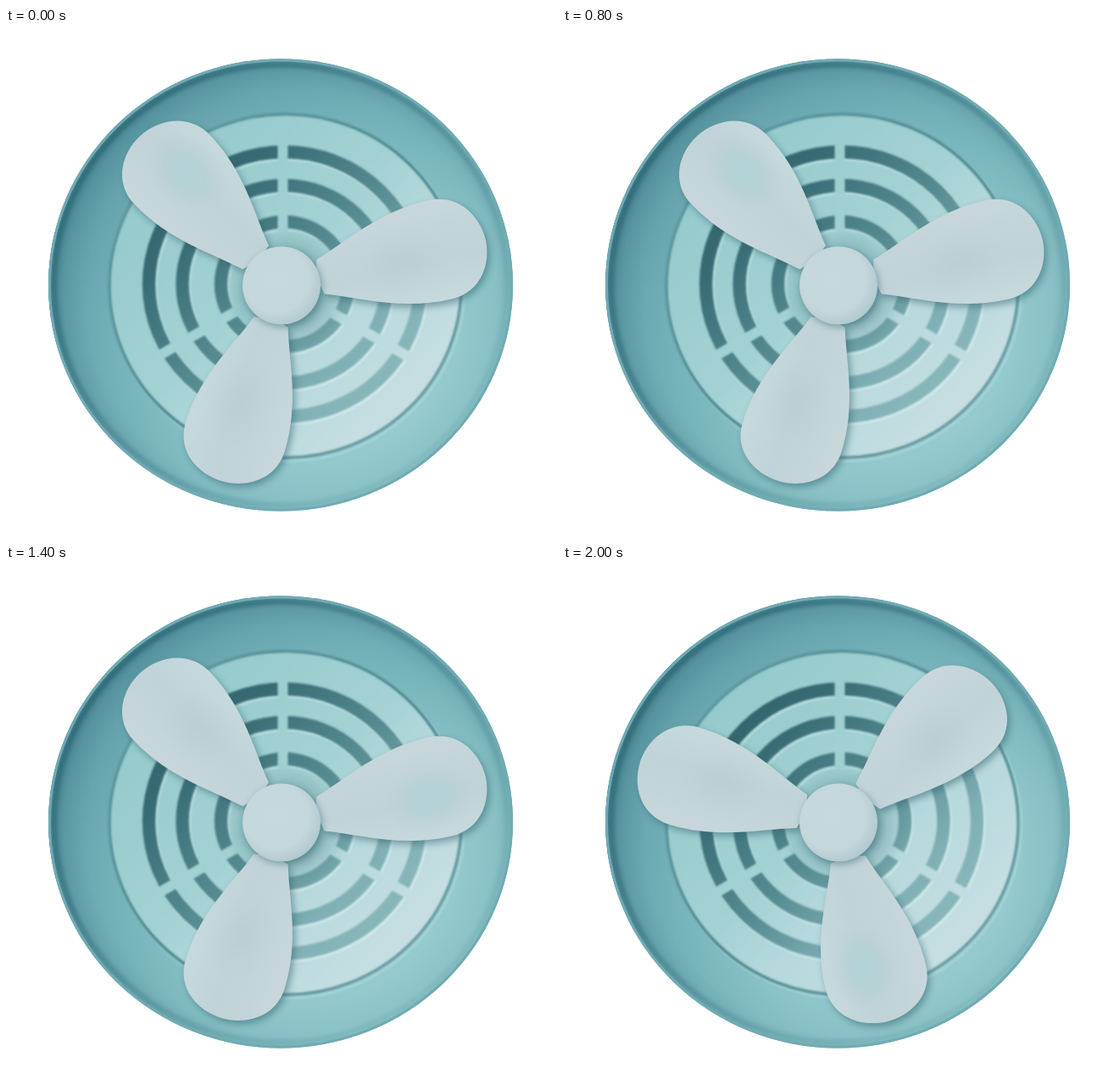
Animation of 650x600 px, one loop 2200 ms. Source, as an HTML page with a canvas:

```html
<!DOCTYPE html>
<html lang="en">
<head>
<meta charset="utf-8">
<title>Fan</title>
<style>
html, body { margin: 0; height: 100%; overflow: hidden; background: #fff; }
canvas { display: block; }
</style>
</head>
<body>
<canvas id="fan" width="650" height="600"></canvas>
<script>
const ctx = document.getElementById('fan').getContext('2d');
const STEP = 200;
// Rotor angle, in degrees, for each step of the loop
const ANGLES = [0, 0, 210, 300, 0, 60, 90, 120, 150, 180, 210];
const rad = deg => deg * Math.PI / 180;

function addStops(grad, stops) {
  stops.forEach(([at, color]) => grad.addColorStop(at, color));
  return grad;
}
const linear = (x0, y0, x1, y1, ...stops) =>
  addStops(ctx.createLinearGradient(x0, y0, x1, y1), stops);
const radial = (x, y, r0, r1, ...stops) =>
  addStops(ctx.createRadialGradient(x, y, r0, x, y, r1), stops);

const bowlFill = linear(140, 110, 510, 500,
  [0, '#65a3ad'], [.45, '#7cb8bf'], [.75, '#8fc6cb'], [1, '#98cdd1']);
const bowlShade = radial(337, 314, 205, 296,
  [0, 'rgba(55,118,130,0)'], [.4, 'rgba(55,118,130,.1)'],
  [.7, 'rgba(50,112,125,.34)'], [1, 'rgba(42,100,114,.85)']);
const lipShade = linear(120, 110, 500, 490,
  [0, 'rgba(40,98,112,.75)'], [.5, 'rgba(50,110,124,.4)'], [1, 'rgba(80,150,160,.15)']);
const grillFill = linear(180, 160, 480, 450,
  [0, '#95cacc'], [.45, '#a3d2d4'], [.65, '#b5d9dc'], [1, '#c8dfe3']);
const slotFill = linear(180, 160, 480, 450,
  [0, '#2f5f69'], [.2, '#386c75'], [.5, '#568b92'], [.75, '#7fb0b5'], [1, '#8fbcc0']);
const edgeFill = linear(180, 160, 480, 450,
  [0, '#5b959d'], [.5, '#4c8790'], [1, '#6a9ca4']);
const glint = linear(180, 160, 480, 450,
  [0, 'rgba(205,234,235,.5)'], [1, 'rgba(222,240,242,.7)']);
const bladeFill = linear(0, -61, 0, 61,
  [0, '#c8d7db'], [.4, '#c2d4d8'], [.6, '#c0d3d8'], [1, '#c6d9dc']);
const hubFill = radial(318, 296, 5, 58,
  [0, '#c7d9dd'], [.65, '#c4d7db'], [1, '#aec7cd']);
const hubShade = radial(331, 309, 38, 74,
  [0, 'rgba(70,120,130,.5)'], [.4, 'rgba(80,130,140,.25)'], [1, 'rgba(80,130,140,0)']);
const cyanSpot = radial(0, 0, 8, 56,
  [0, 'rgba(178,211,214,.9)'], [.45, 'rgba(181,209,213,.75)'], [1, 'rgba(190,208,212,0)']);
const greySpot = radial(0, 0, 5, 55,
  [0, 'rgba(182,202,208,.5)'], [1, 'rgba(185,204,210,0)']);

function oval(x, y, rx, ry) {
  ctx.beginPath();
  ctx.ellipse(x, y, rx, ry, 0, 0, 2 * Math.PI);
}
function fill(style) {
  ctx.fillStyle = style;
  ctx.fill();
}
function stroke(style, width) {
  ctx.strokeStyle = style;
  ctx.lineWidth = width;
  ctx.stroke();
}
function shadow(color, blur, x, y) {
  ctx.shadowColor = color;
  ctx.shadowBlur = blur;
  ctx.shadowOffsetX = x;
  ctx.shadowOffsetY = y;
}

function drawBowl() {
  oval(324, 303, 274, 266.5);
  fill(bowlFill);
  fill(bowlShade);
  ctx.filter = 'blur(2px)';
  oval(324, 303, 267, 259.5);
  stroke(lipShade, 6);
  ctx.filter = 'none';
  oval(324, 303, 272.5, 265);
  stroke('#70abb3', 3);
}

function drawGrill() {
  ctx.filter = 'blur(.9px)';
  oval(332, 307, 208, 203);
  stroke('rgba(172,216,220,.7)', 4);
  oval(329.5, 304, 207.5, 202.5);
  fill(grillFill);
  stroke(edgeFill, 3.5);

  for (const [rx, ry] of [[160, 156], [120.5, 116.5], [75, 73.5]]) {
    oval(330, 304, rx, ry);
    stroke(glint, 17);
    oval(328.5, 302, rx, ry);
    stroke(slotFill, 15.5);
  }
  for (const deg of [-90, 30, 150]) {
    const c = Math.cos(rad(deg)), s = Math.sin(rad(deg));
    ctx.beginPath();
    ctx.moveTo(326.5 + 62 * c, 302 + 62 * s);
    ctx.lineTo(326.5 + 174 * c, 302 + 174 * s);
    stroke(grillFill, 12);
  }
  ctx.filter = 'none';
  oval(331, 309, 74, 74);
  fill(hubShade);
}

function drawBlade(deg, spot, dist, side) {
  ctx.save();
  ctx.translate(326, 303.5);
  ctx.scale(1, .98);
  ctx.rotate(rad(deg));
  ctx.beginPath();
  ctx.moveTo(46, -21);
  ctx.bezierCurveTo(85, -34, 130, -61, 190, -61);
  ctx.bezierCurveTo(228, -61, 246, -28, 246, 0);
  ctx.bezierCurveTo(246, 28, 228, 61, 190, 61);
  ctx.bezierCurveTo(130, 61, 85, 34, 46, 21);
  ctx.quadraticCurveTo(40, 0, 46, -21);
  shadow('rgba(50,100,112,.55)', 9, 3, 4);
  fill(bladeFill);
  shadow('transparent', 0, 0, 0);
  ctx.clip();
  ctx.translate(dist, side);
  ctx.scale(1, .7);
  oval(0, 0, 56, 56);
  fill(spot);
  ctx.restore();
}

function drawHub() {
  oval(325, 303.5, 46, 46);
  shadow('rgba(60,110,120,.55)', 8, 2, 3);
  fill(hubFill);
  shadow('transparent', 0, 0, 0);
}

function draw(now) {
  const angle = ANGLES[Math.floor(now / STEP) % ANGLES.length];
  ctx.clearRect(0, 0, 650, 600);
  drawBowl();
  drawGrill();
  drawBlade(angle - 133, cyanSpot, 176, 10);
  drawBlade(angle - 13, greySpot, 145, 5);
  drawBlade(angle + 107, greySpot, 150, 5);
  drawHub();
  requestAnimationFrame(draw);
}
requestAnimationFrame(draw);
</script>
</body>
</html>
```
